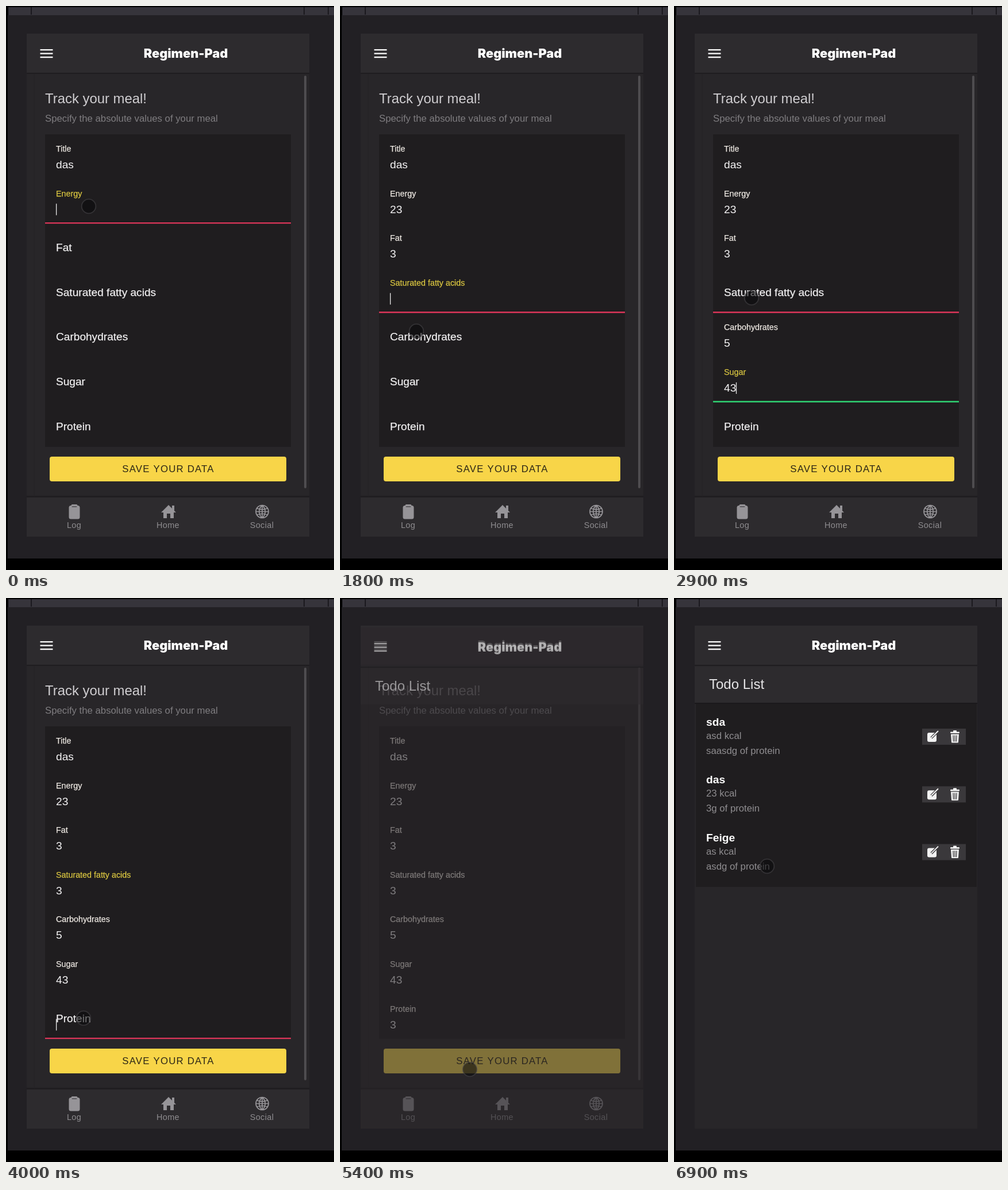
Animation, 571 px wide and 980 px high, one loop 7 s. Source, as an HTML page with a canvas:

```html
<!DOCTYPE html>
<html lang="en">
<head>
<meta charset="utf-8">
<title>Meal tracker</title>
<style>
  html, body { margin: 0; height: 100%; overflow: hidden; background: #000; }
  canvas { display: block; }
</style>
</head>
<body>
<canvas id="stage" width="571" height="980"></canvas>
<script>
const ctx = document.getElementById('stage').getContext('2d');
const LOOP = 7000;
const SANS = '"Liberation Sans", Arial, sans-serif';
const BAR = '#2d2b2e', PAGE = '#282629', PANEL = '#1f1d1f', GREY = '#8f8d90';
const RED = '#dc3559', GREEN = '#2fd673', YELLOW = '#d9c540';

// focus: [from, to] spans; keys: [time, character]
const fields = [
  { label: 'Title', focus: [], keys: [...'das'].map(c => [-1, c]) },
  { label: 'Energy', focus: [[-400, 1100]], keys: [[300, '2'], [500, '3']] },
  { label: 'Fat', focus: [[1100, 1600]], keys: [[1300, '3']] },
  { label: 'Saturated fatty acids', focus: [[1600, 1900], [3200, 3970]], keys: [[3450, '3']] },
  { label: 'Carbohydrates', focus: [[1900, 2400]], keys: [[2150, '5']] },
  { label: 'Sugar', focus: [[2400, 3200]], keys: [[2600, '4'], [2750, '3']] },
  { label: 'Protein', focus: [[3970, 5040]], keys: [[4350, '3']] },
];

const meals = [
  ['sda', 'asd kcal', 'saasdg of protein'],
  ['das', '23 kcal', '3g of protein'],
  ['Feige', 'as kcal', 'asdg of protein'],
];

// time, x, y
const pointerPath = [
  [0, 144, 348], [500, 144, 348], [800, 133, 393], [900, 125, 425], [1100, 125, 425],
  [1400, 130, 497], [1600, 130, 497], [1800, 133, 565], [1900, 133, 577], [2100, 133, 577],
  [2400, 133, 652], [2600, 133, 652], [2900, 135, 507], [3450, 135, 507], [3900, 135, 730],
  [4300, 135, 730], [4600, 226, 819], [5500, 226, 819], [5900, 321, 360], [6300, 225, 340],
  [6500, 70, 325], [6700, 75, 385], [6900, 162, 466], [7000, 162, 466],
];

const clamp = v => Math.max(0, Math.min(1, v));
const ramp = (t, from, length) => clamp((t - from) / length);
const ease = p => p * p * (3 - 2 * p);
const mix = (a, b, p) => a + (b - a) * p;

function box(x, y, w, h, color, radius = 0) {
  ctx.fillStyle = color;
  ctx.beginPath();
  ctx.roundRect(x, y, w, h, radius);
  ctx.fill();
}

function text(str, x, y, size, color, { weight = 400, align = 'left', spacing = 0, font = SANS } = {}) {
  ctx.font = `${weight} ${size}px ${font}`;
  ctx.textAlign = align;
  ctx.letterSpacing = spacing + 'px';
  ctx.fillStyle = color;
  ctx.fillText(str, x, y);
}

function shape(path, x, y, color) {
  ctx.save();
  ctx.translate(x, y);
  ctx.fillStyle = color;
  ctx.fill(new Path2D(path));
  ctx.restore();
}

function stroke(path, x, y, color, width) {
  ctx.save();
  ctx.translate(x, y);
  ctx.strokeStyle = color;
  ctx.lineWidth = width;
  ctx.stroke(new Path2D(path));
  ctx.restore();
}

function drawFrame() {
  box(0, 0, 571, 980, '#000');
  box(3, 16, 568, 944, '#222024');
  box(4, 2, 567, 14, '#36343b');
  for (const x of [43, 518, 560]) box(x, 2, 2, 13, '#1b191e');
}

function drawHeader() {
  box(36, 116, 492, 2, '#1f1d20');
  box(36, 48, 492, 68, BAR);
  for (const y of [75, 81.4, 87.8]) box(59.5, y, 22, 2.4, '#f4f4f4');
  text('Regimen-Pad', 313, 90, 21.7, '#fff', { weight: 900, align: 'center', font: 'Inter, sans-serif' });
}

function drawTabs() {
  const gray = '#969498';
  box(36, 851, 492, 3, '#201e21');
  box(36, 854, 492, 68, BAR);
  box(109.5, 868, 19, 23.5, gray, 3.5);
  box(113.5, 866, 11, 5, gray, 2);
  box(114.5, 869, 9, 2, '#5d5b5f', 1);
  shape('M0-12 13 1 9 1 9 11 3 11 3 3-3 3-3 11-9 11-9 1-13 1ZM6-11h4v9l-4-4Z', 283, 879, gray);
  stroke('M-11 0A11 11 0 1 0 11 0A11 11 0 1 0-11 0M-11 0H11M0-11V11M-9-5.5Q0-2 9-5.5M-9 5.5Q0 2 9 5.5' +
    'M0-11C-7-5-7 5 0 11M0-11C7-5 7 5 0 11', 446, 878.5, gray, 1.7);
  ['Log', 'Home', 'Social'].forEach((name, i) =>
    text(name, 118.5 + i * 163.5, 907, 14.4, GREY, { align: 'center', spacing: 0.4 }));
}

function drawField(field, row, t) {
  const base = 253 + row * 77.6;
  const typed = field.keys.filter(k => k[0] <= t);
  const value = typed.map(k => k[1]).join('');
  const span = field.focus.filter(f => f[0] <= t).pop();
  const active = span && t < span[1];
  const glowing = span && t < span[1] + 100;

  let lift = value ? 1 : 0;
  if (!value && span) lift = active ? ramp(t, span[0] + 40, 120) : 1 - ramp(t, span[1], 120);
  lift = ease(lift);
  const color = glowing && lift > 0.3 ? YELLOW : lift > 0.5 ? '#eee9e3' : '#f1f0f1';
  const size = mix(19.1, 14.3, lift), y = mix(base + 18, base, lift);
  text(field.label, 87, y, size, color);
  ctx.strokeStyle = color;
  ctx.lineWidth = 0.25;
  ctx.strokeText(field.label, 87, y);

  text(value, 87, base + 29, 19.2, '#f4f3f4');
  if (active) {
    const caretX = 87 + (value ? ctx.measureText(value).width - 0.5 : 0);
    const since = Math.max(span[0], ...typed.map(k => k[0]));
    if ((t - since) % 1000 < 500) box(caretX, base + 13, 1.3, 20, '#e8e8e8');
  }
  if (active || (span && !value)) box(68, base + 45.3, 428, 2.4, value ? GREEN : RED);
}

function drawForm(t) {
  box(36, 48, 492, 874, PAGE);
  drawHeader();
  box(48, 118, 2, 733, '#252326');
  box(519, 121, 4, 717, '#4e4c4f', 2);
  text('Track your meal!', 68, 169, 23.9, '#d0ced1');
  text('Specify the absolute values of your meal', 68, 201, 16.75, '#7f7d80');
  box(68, 223, 428, 543, PANEL);
  fields.forEach((field, row) => drawField(field, row, t));

  box(76, 783, 412, 43, '#f8d548', 4);
  if (t > 5040) {
    ctx.save();
    ctx.beginPath();
    ctx.roundRect(76, 783, 412, 43, 4);
    ctx.clip();
    ctx.fillStyle = 'rgba(255,230,110,.25)';
    ctx.beginPath();
    ctx.arc(231, 815, 70 + 350 * ramp(t, 5040, 450), 0, 7);
    ctx.fill();
    ctx.restore();
  }
  text('SAVE YOUR DATA', 282.5, 809.5, 16.8, '#2b2516', { align: 'center', spacing: 1.2 });
  drawTabs();
}

function drawTrash(x, y) {
  box(x - 8, y - 8, 16, 2.6, '#f2f2f2', 1);
  box(x - 3, y - 10.5, 6, 4, '#f2f2f2', 1);
  shape('M-7-4H7L6 10Q6 11 5 11H-5Q-6 11-6 10Z', x, y, '#f2f2f2');
  stroke('M-3-2-2.5 9M0-2V9M3-2 2.5 9', x, y, '#3a383b', 1.3);
}

function drawEdit(x, y) {
  box(x - 9, y - 7, 16, 16, '#f2f2f2', 3);
  stroke('M-2 2 10-10', x, y, '#3a383b', 4.5);
  stroke('M-2 2 10-10', x, y, '#f2f2f2', 2);
}

function drawList(t) {
  box(36, 48, 492, 874, PAGE);
  drawHeader();
  box(36, 119, 492, 63, BAR);
  text('Todo List', 61, 158, 24, '#e6e5e7');
  if (t < 5560) return;
  box(38, 183, 489, 319, PANEL);
  box(36, 182, 492, 2, '#1b191c');
  meals.forEach(([name, energy, protein], i) => {
    const y = i * 100.3;
    text(name, 56, 222 + y, 19.2, '#fff', { weight: 700 });
    text(energy, 56, 245 + y, 16.75, GREY);
    text(protein, 56, 271 + y, 16.75, GREY);
    box(432, 227 + y, 76, 28, '#3a383b');
    if (t >= 5680) drawEdit(450, 241 + y);
    if (t >= 6050) drawTrash(489, 240.5 + y);
  });
}

function drawPointer(t) {
  const next = pointerPath.findIndex(p => p[0] > t);
  const [t0, x0, y0] = pointerPath[next - 1], [t1, x1, y1] = pointerPath[next];
  const p = ease(ramp(t, t0, t1 - t0));
  ctx.beginPath();
  ctx.arc(mix(x0, x1, p), mix(y0, y1, p), 12.3, 0, 7);
  ctx.fillStyle = 'rgba(8,8,10,.57)';
  ctx.fill();
  ctx.strokeStyle = 'rgba(75,73,77,.55)';
  ctx.lineWidth = 1.8;
  ctx.stroke();
}

function render() {
  const t = performance.now() % LOOP;
  const enter = ramp(t, 5240, 280);
  drawFrame();
  ctx.save();
  ctx.beginPath();
  ctx.rect(36, 48, 492, 874);
  ctx.clip();
  if (enter < 1) drawForm(t);
  if (enter > 0) {
    ctx.globalAlpha = enter;
    ctx.translate(0, 40 * (1 - enter) ** 3);
    drawList(t);
  }
  ctx.restore();
  drawPointer(t);
  requestAnimationFrame(render);
}
render();
</script>
</body>
</html>
```
